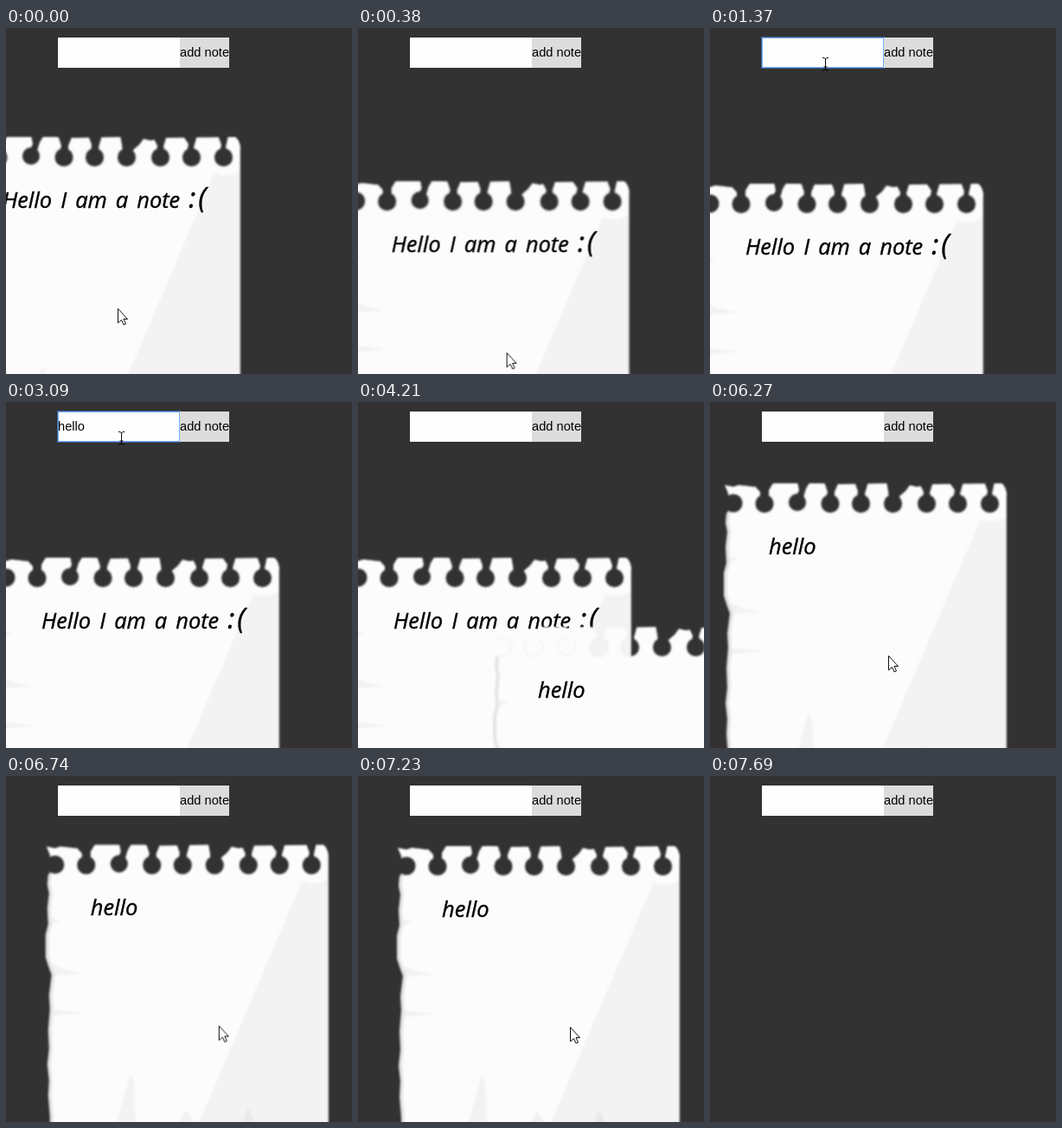
An HTML page for the animation above (8.68 s loop, 400 px wide and 400 px high).

```html
<!DOCTYPE html>
<html lang="en">
<head>
<meta charset="utf-8">
<title>Notes</title>
<style>
  html, body { margin: 0; width: 100%; height: 100%; overflow: hidden; background: #323232; }
  .stage { position: relative; width: 400px; height: 400px; overflow: hidden; background: #323232; }
  .stage::after { content: ""; position: absolute; left: 0; right: 0; bottom: 0; height: 2px; background: #362f32; }
  .field, .button { position: absolute; top: 11px; height: 35px; font: 14.667px/35px Arial, "Liberation Sans", sans-serif; color: #000; white-space: pre; }
  .field { left: 60px; width: 141px; background: #fefefe; }
  .button { left: 201px; width: 57px; background: #dcdcdc; }
  .ring { position: absolute; inset: 0; box-shadow: inset 0 0 0 1px #79aef7, 0 0 0 1px rgba(77, 144, 254, .5); opacity: 0; }
  .typed { position: absolute; left: 0; top: 0; width: 0; height: 35px; overflow: hidden; }
  .caret { position: absolute; left: 0; top: 9px; width: 1px; height: 16px; background: #000; opacity: 0; }
  svg { position: absolute; left: 0; top: 0; width: 400px; height: 400px; z-index: 1; }
  .text { font: italic 25.5px "Open Sans", sans-serif; word-spacing: 3.4px; fill: #000; stroke: #000; stroke-width: .4px; }
  .smile { font-size: 32px; letter-spacing: 3px; }

  .note, .cursor { animation: 8680ms ease-in-out infinite; }
  .first { animation-name: first; }
  .second { animation-name: second; }
  .cursor { animation-name: cursor; }
  .arrow, .beam, .ring, .typed, .caret { animation: 8680ms step-end infinite; }
  .arrow { animation-name: arrow; }
  .beam { animation-name: beam; }
  .field .ring { animation-name: fieldRing; }
  .button .ring { animation-name: buttonRing; }
  .typed { animation-name: typed; }
  .caret { animation-name: caret; }

  @keyframes first {
    0%, .35% { transform: translate(-55px, 126px); }
    5.18%, 52.53% { transform: translate(-10px, 180px); }
    57.37%, 58.06% { transform: translate(-175px, 197px); }
    59.1%, 59.39% { transform: translate(-243px, 255px); }
    60.14%, 100% { transform: translate(-345px, 330px); }
  }
  @keyframes second {
    0%, 47.47% { transform: translate(420px, 420px); }
    48.5%, 49.08% { transform: translate(157px, 260px); }
    51.84%, 62.56% { transform: translate(121px, 86px); }
    66% { transform: translate(12px, 95px); }
    67.05%, 73.73% { transform: translate(17px, 94px); }
    75.58% { transform: translate(-4px, 90px); }
    78.34% { transform: translate(54px, 78px); }
    80.76% { transform: translate(50px, 78px); }
    83.29%, 83.58% { transform: translate(46px, 81px); }
    85.02% { transform: translate(84px, 77px); }
    88.59%, 100% { transform: translate(-345px, 190px); }
  }
  @keyframes cursor {
    0%, .35% { transform: translate(129px, 324px); }
    5.18%, 5.7% { transform: translate(174px, 378px); }
    9.68%, 35.6% { transform: translate(133px, 41px); }
    37.3%, 39% { transform: translate(228px, 30px); }
    41.94% { transform: translate(325px, 345px); }
    42.63% { transform: translate(420px, 460px); }
    70.97% { transform: translate(240px, 410px); }
    72.24%, 72.9% { transform: translate(206px, 293px); }
    73.73% { transform: translate(216px, 303px); }
    75.58% { transform: translate(195px, 299px); }
    78.34% { transform: translate(253px, 287px); }
    80.76% { transform: translate(249px, 287px); }
    83.29%, 83.58% { transform: translate(245px, 290px); }
    85.02% { transform: translate(283px, 286px); }
    88.59%, 100% { transform: translate(-146px, 399px); }
  }
  @keyframes arrow {
    0%, 36.6%, 100% { opacity: 1; }
    9.5% { opacity: 0; }
  }
  @keyframes beam {
    0%, 36.6%, 100% { opacity: 0; }
    9.5% { opacity: 1; }
  }
  @keyframes fieldRing {
    0%, 38.36%, 100% { opacity: 0; }
    10.02% { opacity: 1; }
  }
  @keyframes buttonRing {
    0%, 45.74%, 100% { opacity: 0; }
    38.36% { opacity: 1; }
  }
  @keyframes typed {
    0%, 38.36%, 100% { width: 0; }
    18.55% { width: 8px; }
    19.24% { width: 16px; }
    21.43% { width: 20px; }
    22.81% { width: 23px; }
    25.58% { width: 32px; }
  }
  @keyframes caret {
    0%, 100% { left: 0; opacity: 0; }
    10.02% { left: 0; opacity: 1; }
    15.78% { left: 0; opacity: 0; }
    18.55% { left: 8px; opacity: 1; }
    19.24% { left: 16px; opacity: 1; }
    21.43% { left: 20px; opacity: 1; }
    22.81% { left: 23px; opacity: 1; }
    25.58% { left: 31px; opacity: 1; }
    32.37% { left: 31px; opacity: 0; }
  }
</style>
</head>
<body>
<div class="stage">
  <div class="field"><span class="typed">hello</span><i class="caret"></i><i class="ring"></i></div>
  <div class="button">add note<i class="ring"></i></div>

  <svg viewBox="0 0 400 400">
    <defs>
      <filter id="soft" x="-10" y="-10" width="350" height="490" filterUnits="userSpaceOnUse">
        <feGaussianBlur stdDeviation=".9"/>
      </filter>
      <mask id="punch" x="-10" y="-10" width="350" height="490" maskUnits="userSpaceOnUse">
        <rect x="-10" y="-10" width="350" height="490" fill="#fff"/>
        <g id="holes">
          <circle cx="10" cy="23" r="10.5"/>
          <circle cx="46" cy="23.5" r="10.5"/>
          <circle cx="84" cy="22" r="10"/>
          <circle cx="122" cy="23.5" r="10.5"/>
          <circle cx="157.5" cy="23.5" r="10.5"/>
          <circle cx="194.5" cy="23.5" r="10.5"/>
          <circle cx="233.5" cy="23.5" r="10.5"/>
          <circle cx="269.5" cy="23.5" r="10.5"/>
          <circle cx="306.5" cy="23.5" r="10.5"/>
        </g>
        <path d="M-5 14 6 14 10 23 4 32-5 32z
          M30-2 57-2 51 8 51 20 41 20 41 10z M84-2 99-2 94 6 91 16 82 16 86 8z
          M115-2 132-2 127 10 127 18 117 18 119 10z M150-2 166-2 162 12 163 18 153 18 154 9z
          M187-2 217-2 209 9 203 14 200 18 190 18 189 9z M224-2 241-2 237 11 239 18 229 18 230 10z
          M259-2 276-2 272 12 274 18 264 18 266 8z M300-2 312-2 309 12 311 18 302 18 304 9z"/>
      </mask>
      <g id="paper" filter="url(#soft)">
        <g mask="url(#punch)">
          <path fill="#fcfcfc" d="M0 2 10 4 16 2 26 3 33 4 57 0 110 0 135 1 187 0 213 2 222 4 240 1 320 0Q324 2 326 11V460H6
            L6 314 4 290 5 272 3 254 5 236 4 214 6 190 5 174 8 150 5 142 1 130 1 104 4 92 3 74 5 56 3 46 4 34 5 14z"/>
          <path fill="#f3f3f3" d="M296 41Q309 49 326 39V460H117z"/>
          <path fill="#f2f2f2" d="M7 138 20 144 42 149 8 151z M6 190 25 192 44 194 5 198z M4 84 16 87 5 93z
            M98 265 94 275 82 320 103 320 101 275z M161 307 153 320 170 320z"/>
          <path fill="#e9e9e9" d="M233 304 227 320 240 320z"/>
          <path fill="none" stroke="#e4e4e4" stroke-width="4" d="M6 460 6 314 4 290 5 272 3 254 5 236 4 214 6 190 5 174 8 150 5 142 1 130 1 104 4 92 3 74 5 56 3 46 4 34"/>
          <path fill="none" stroke="#d4d4d4" d="M325.5 14V460"/>
          <use href="#holes" fill="none" stroke="#efefef" stroke-width="2"/>
        </g>
      </g>
    </defs>

    <g class="note first">
      <use href="#paper"/>
      <text class="text" x="51" y="82">Hello I am a note <tspan class="smile">:(</tspan></text>
    </g>
    <g class="note second">
      <use href="#paper"/>
      <text class="text" x="51" y="82">hello</text>
    </g>
    <g class="cursor">
      <path class="arrow" fill="#fff" stroke="#111" d="M.5.5V17L4.5 13.5 7 19 9.5 18 7 12.5H11.5z"/>
      <path class="beam" fill="none" stroke="#000" d="M-3-6.5H-1.5L.5-5.5 2.5-6.5H4M.5-5.5V7M-3 8H-1.5L.5 7 2.5 8H4M-1.5 4H2.5"/>
    </g>
  </svg>
</div>
</body>
</html>
```
